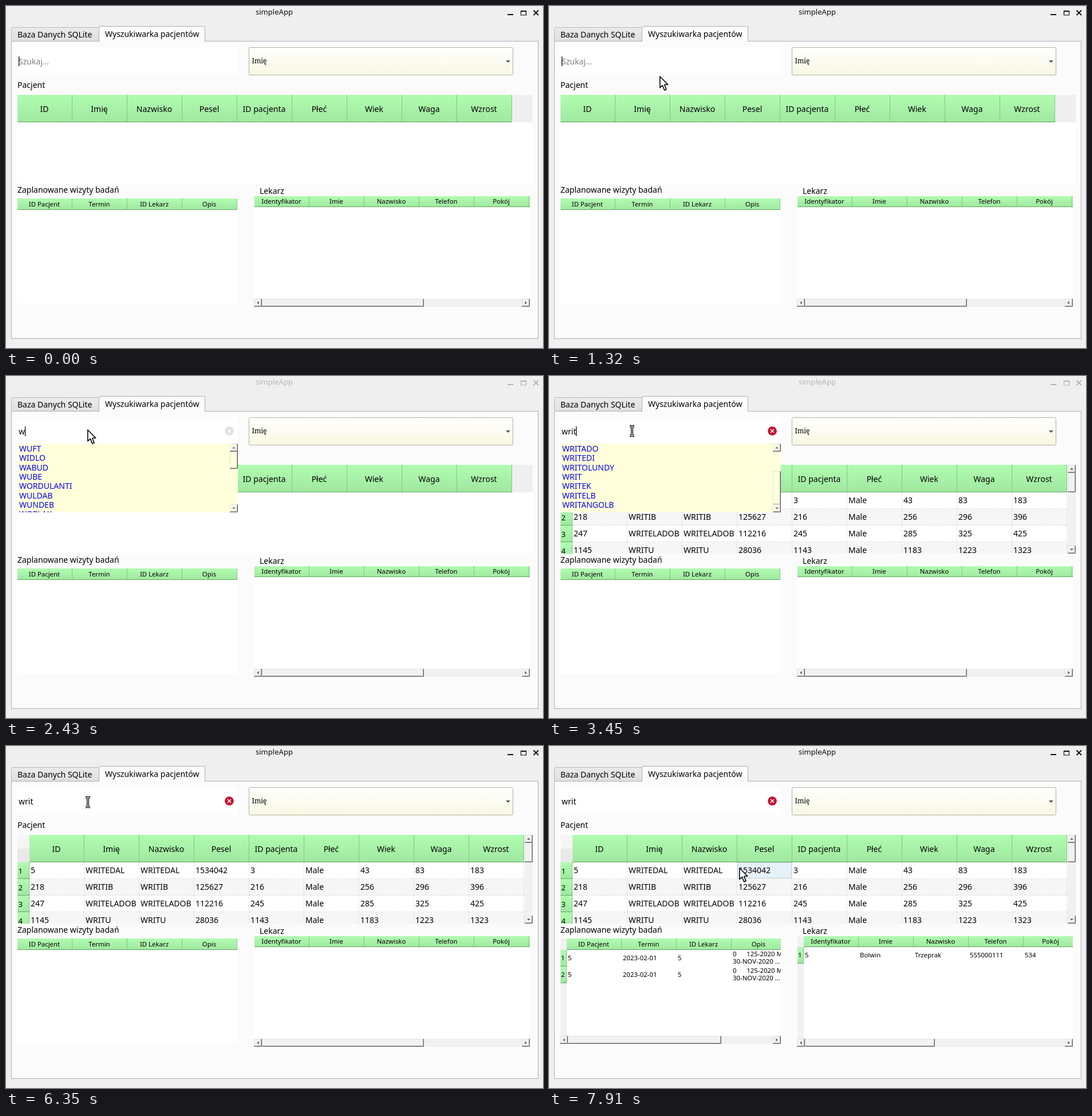
An HTML page that plays this animation: 938 by 597 pixels, repeating every 8 s.

```html
<!DOCTYPE html>
<html lang="pl">
<head>
<meta charset="utf-8">
<title>simpleApp</title>
<style>
html, body { margin: 0; width: 100%; height: 100%; overflow: hidden; background: #efefef; }
#stage { display: block; width: 938px; height: 597px; }
text { font-family: "Noto Sans", "Open Sans", sans-serif; fill: #000; white-space: pre; }
.mid { text-anchor: middle; }
.serif { font-family: "Noto Serif", serif; }
.dots { stroke: #c4c4c4; stroke-dasharray: 1 2; }
</style>
</head>
<body>
<svg id="stage" viewBox="0 0 938 597"></svg>
<script>
const LOOP = 8000, COL = 96;

// Drawing helpers
const rect = (x, y, w, h, fill, more = '') =>
  `<rect x="${x}" y="${y}" width="${w}" height="${h}" fill="${fill}" ${more}/>`;
const text = (x, y, s, size = 14, more = '') =>
  `<text x="${x}" y="${y}" font-size="${size}" ${more}>${s}</text>`;
const path = (d, more) => `<path d="${d}" ${more}/>`;
const group = (id, body, more = '') => `<g id="${id}" ${more}>${body}</g>`;
const clip = (x, y, w, h, body) =>
  `<svg x="${x}" y="${y}" width="${w}" height="${h}" viewBox="${x} ${y} ${w} ${h}">${body}</svg>`;
const gradient = (id, from, to) =>
  `<linearGradient id="${id}" x2="0" y2="1"><stop stop-color="${from}"/><stop offset="1" stop-color="${to}"/></linearGradient>`;

const greenCell = (x, y, w, h) =>
  rect(x, y, w, h, 'url(#green)') + rect(x + w - 1, y, 1, h, '#83c583') + rect(x, y + h - 1, w, 1, '#5fa75f');

const header = (x, y, h, names, size, base) => names.map((name, i) =>
  greenCell(x + i * COL, y, COL, h) + text(x + i * COL + COL / 2 - 1, base, name, size, 'class="mid"')).join('');

const bevel = (x, y, w, h, fill) => rect(x, y, w, h, fill) +
  path(`M${x + .5} ${y + h - 1}V${y + .5}H${x + w - 1}`, 'fill="none" stroke="#e2e2e2"') +
  path(`M${x + w - 1.5} ${y + 1}V${y + h - 1.5}H${x + 1}`, 'fill="none" stroke="#a4a4a4"') +
  path(`M${x + w - .5} ${y}V${y + h - .5}H${x}`, 'fill="none" stroke="#686868"');

const arrowHead = (x, y, turn, fill) =>
  path('M-3 1.5L0 -1.5L3 1.5Z', `transform="translate(${x} ${y}) rotate(${turn})" fill="${fill}"`);

const hScroll = (x, y, w, thumb) => rect(x, y, w, 14, '#f1f1f1') +
  bevel(x, y, 14, 14, '#f2f2f2') + arrowHead(x + 7, y + 7, -90, '#555') +
  bevel(x + 14, y, thumb, 14, '#f2f2f2') +
  bevel(x + w - 14, y, 14, 14, '#f2f2f2') + arrowHead(x + w - 7, y + 7, 90, '#555');

const vScroll = (x, y, h, from, to, face, ink) => rect(x, y, 14, h, face) +
  bevel(x, y, 14, 14, face) + arrowHead(x + 7, y + 7, 0, ink) +
  bevel(x, from, 14, to - from, face) +
  bevel(x, y + h - 14, 14, 14, face) + arrowHead(x + 7, y + h - 7, 180, ink);

// Window parts
const windowButtons = rect(876, 14, 10, 2, 'currentColor') +
  path('M899.5 8.5H908.5V16H899.5ZM899 9.5H909', 'fill="none" stroke="currentColor" stroke-width="1.2"') +
  path('M921.5 7.5L930 16M930 7.5L921.5 16', 'stroke="currentColor" stroke-width="1.9"');

const frame =
  group('title', text(468.5, 15, 'simpleApp', 13.1, 'class="mid" style="fill:currentColor"') + windowButtons) +
  rect(9.5, 37.5, 153, 24, 'url(#tab)', 'rx="2" stroke="#b8b8b8"') +
  rect(9.5, 61.5, 920, 519, '#fbfbfb', 'stroke="#aeaeae"') +
  path('M162.5 62V37Q162.5 35.5 164 35.5H346Q347.5 35.5 347.5 37V62', 'fill="#fbfbfb" stroke="#b0b0b0"') +
  text(20, 54.5, 'Baza Danych SQLite') + text(173, 54, 'Wyszukiwarka pacjentów') +
  rect(19, 72, 386, 48, '#fff') +
  rect(424.5, 72.5, 461, 48, 'url(#combo)', 'rx="2" stroke="#b3b19a"') +
  text(429.5, 100, 'Imię', 12, 'class="serif"') + path('M873 95H881L877 99Z', 'fill="#555"') +
  text(20, 143, 'Pacjent') + text(20, 326, 'Zaplanowane wizyty badań') + text(443, 328, 'Lekarz');

const patientCols = ['ID', 'Imię', 'Nazwisko', 'Pesel', 'ID pacjenta', 'Płeć', 'Wiek', 'Waga', 'Wzrost'];
const patients = [
  [5, 'WRITEDAL', 1534042], [218, 'WRITIB', 125627], [247, 'WRITELADOB', 112216], [1145, 'WRITU', 28036]
];

const patientRow = ([id, name, pesel], i) => {
  const y = 203 + i * 29;
  const cells = [id, name, name, pesel, id - 2, 'Male', id + 38, id + 78, id + 178];
  return rect(41, y, 865, 29, i % 2 ? '#f6f6f6' : '#fff') + (i ? '' : group('hover',
      rect(329.5, y + .5, 94, 27, '#e6f1fa', 'stroke="#c3d6e6"'))) +
    path(`M41 ${y + 28.5}H906`, 'class="dots"') + greenCell(20, y, 21, 29) +
    text(21.5, y + 19.5, i + 1, 13, 'font-weight="500"') +
    cells.map((c, k) => text(43 + k * COL, y + 19, c) +
      path(`M${41 + (k + 1) * COL - .5} ${y}V${y + 29}`, 'class="dots"')).join('');
};

const emptyPatients = rect(20, 155, 900, 48, '#efefef') + header(20, 155, 48, patientCols, 14, 185);
const fullPatients = rect(20, 155, 21, 24, '#f5f5f5') + rect(20, 179, 21, 24, '#e9e9e9') +
  header(41, 155, 48, patientCols, 14, 185) + patients.map(patientRow).join('') +
  vScroll(906, 155, 155, 169, 203, '#f1f1f1', '#555');

const visitCols = ['ID Pacjent', 'Termin', 'ID Lekarz', 'Opis'];
const doctorCols = ['Identyfikator', 'Imie', 'Nazwisko', 'Telefon', 'Pokój', ''];
const SMALL = 11.4;
const smallRow = (x, y, n, cells) => greenCell(x, y, 11, 29) + text(x + 1, y + 18, n, SMALL) +
  cells.map((c, k) => text(x + 13 + k * COL, y + 18, c, SMALL)).join('');

const emptyVisits = header(20, 336, 20, visitCols, SMALL, 350);
const fullVisits = rect(20, 336, 11, 170, '#f1f1f1') + header(31, 336, 20, visitCols, SMALL, 350) +
  [0, 1].map(i => smallRow(20, 356 + i * 29, i + 1, [5, '2023-02-01', 5]) +
    text(321, 367 + i * 29, '0      125-2020 M', SMALL) +
    text(321, 380 + i * 29, '30-NOV-2020 ...', SMALL)).join('') + hScroll(19, 506, 386, 268);

const emptyDoctors = header(434, 332, 19, doctorCols, SMALL, 345) + hScroll(433, 511, 482, 283);
const fullDoctors = rect(434, 332, 11, 179, '#f1f1f1') + header(445, 332, 19, doctorCols, SMALL, 345) +
  smallRow(434, 351, 1, [5, 'Bolwin', 'Trzeprak', '555000111', 534]) + hScroll(433, 511, 482, 227);

// Suggestions for each typed prefix: names, then thumb start and end
const suggestions = [
  [['WUFT', 'WIDLO', 'WABUD', 'WUBE', 'WORDULANTI', 'WULDAB', 'WUNDEB', 'WOPLAK'], 132, 162],
  [['WRITEDAL', 'WRITIB', 'WRITELADOB', 'WRIDAN', 'WRIPOLTA', 'WRITU', 'WRABEK', 'WREDOL'], 132, 170],
  [['WRITEDAL', 'WRITIB', 'WRITELADOB', 'WRIDAN', 'WRIPOLTA', 'WRITU', 'WRITADO', 'WRITEDI'], 132, 182],
  [['WRITADO', 'WRITEDI', 'WRITOLUNDY', 'WRIT', 'WRITEK', 'WRITELB', 'WRITANGOLB'], 166, 225]
];
const popup = ([names, from, to], i) => group('popup' + (i + 1), clip(20, 118, 385, 120,
  rect(20, 118, 385, 120, '#ffffdc') +
  names.map((n, k) => text(23, 132 + k * 16.33, n, 14, 'style="fill:#0000f0"')).join('') +
  vScroll(391, 118, 120, from, to, '#ffffdc', '#5a6ad0')));

const beam = 'M-4 -8.5Q0 -8.5 0 -6V6Q0 8.5 -4 8.5M4 -8.5Q0 -8.5 0 -6M0 6Q0 8.5 4 8.5';
const cursors =
  group('arrow', path('M.8 1V20.6L5.3 16.6L8.7 25L12 23.6L8.6 15.5L14.6 15.2Z',
    'fill="#fff" stroke="#111" stroke-width="1.7" stroke-linejoin="round"')) +
  group('beam', path(beam, 'fill="none" stroke="#111" stroke-width="4"') +
    path(beam, 'fill="none" stroke="#fff" stroke-width="1.2"'));

const stage = document.getElementById('stage');
stage.innerHTML = '<defs>' + gradient('green', '#b1fcb1', '#a0e7a0') + gradient('tab', '#ebebeb', '#dfdfdf') +
  gradient('combo', '#fffffe', '#f8f8e3') + '</defs>' +
  rect(0, 0, 938, 597, '#efefef') + frame +
  text(22, 102, 'Szukaj...', 14, 'id="hint" style="fill:#7d7d7d"') + text(22, 102, '', 14, 'id="query"') +
  group('caret', rect(0, 88, 1.2, 17, '#000')) +
  group('clear', '<circle cx="390" cy="96" r="7.8" fill="#c9102f"/>' +
    path('M387 93L393 99M393 93L387 99', 'stroke="#fff" stroke-width="1.6"')) +
  clip(19, 154, 901, 156, rect(19, 154, 901, 156, '#fff') + group('noPatients', emptyPatients) + group('patients', fullPatients)) +
  clip(19, 336, 386, 184, rect(19, 336, 386, 184, '#fff') + group('noVisits', emptyVisits) + group('visits', fullVisits)) +
  clip(433, 332, 482, 193, rect(433, 332, 482, 193, '#fff') + group('noDoctors', emptyDoctors) + group('doctors', fullDoctors)) +
  suggestions.map(popup).join('') + group('mouse', cursors);

// Timeline
const typed = [[0, ''], [2430, 'w'], [2870, 'wr'], [3140, 'wri'], [3300, 'writ']];
const caretOn = [[0, 410], [890, 1370], [1850, 3930], [4410, 5010], [5570, 6350], [6830, 7310], [7790, 7860]];
const beamOn = [[1480, 2430], [3450, 7330]];
const route = [
  [610, 150, 540], [760, 150, 440], [960, 158, 290], [1130, 172, 195], [1230, 200, 156], [1320, 193, 122],
  [1420, 193, 122], [1880, 150, 97], [2020, 150, 97], [2140, 142, 93], [2430, 142, 93], [3300, 142, 93],
  [3450, 145, 96], [4990, 145, 96], [5200, 143, 98], [6670, 143, 98], [6850, 178, 98], [7200, 265, 104],
  [7340, 312, 128], [7490, 334, 186], [7540, 334, 190], [7800, 332, 212], [8000, 332, 212]
];

const within = (spans, t) => spans.some(([a, b]) => t >= a && t < b);
const mouseAt = t => {
  const i = route.findIndex(p => p[0] > t);
  if (i < 1) return route[0].slice(1);
  const [t0, x0, y0] = route[i - 1], [t1, x1, y1] = route[i], k = (t - t0) / (t1 - t0);
  return [x0 + (x1 - x0) * k, y0 + (y1 - y0) * k];
};

const part = id => document.getElementById(id);
const show = (id, on) => { part(id).style.display = on ? '' : 'none'; };

function draw(t) {
  const query = typed.filter(s => s[0] <= t).pop()[1];
  const popupOpen = t >= 2430 && t < 5720, picked = t >= 7860;
  part('query').textContent = query;
  show('hint', !query);
  show('caret', within(caretOn, t));
  const caretX = query ? Math.floor(22 + part('query').getComputedTextLength()) : 22;
  part('caret').setAttribute('transform', `translate(${caretX} 0)`);
  part('title').style.color = t >= 2430 && t < 5800 ? '#b4b4b4' : '#111';
  const fade = Math.min(1, .15 + (t - 2430) / 200);
  part('clear').style.opacity = query ? fade : 0;
  part('clear').style.filter = query && fade < 1 ? `saturate(${fade})` : '';
  suggestions.forEach((_, i) => show('popup' + (i + 1), popupOpen && query.length === i + 1));

  show('patients', t >= 3140);
  show('noPatients', t < 3140);
  part('hover').style.opacity = Math.max(0, Math.min(1, (t - 7680) / 150));
  for (const [full, empty] of [['visits', 'noVisits'], ['doctors', 'noDoctors']]) {
    show(full, picked);
    show(empty, !picked);
  }

  const isBeam = within(beamOn, t);
  show('mouse', t >= 610);
  show('beam', isBeam);
  show('arrow', !isBeam);
  part('mouse').setAttribute('transform', `translate(${mouseAt(t).map(v => Math.round(v)).join(' ')})`);
}

const start = performance.now();
function tick() {
  draw((performance.now() - start) % LOOP);
  requestAnimationFrame(tick);
}
tick();
</script>
</body>
</html>
```
